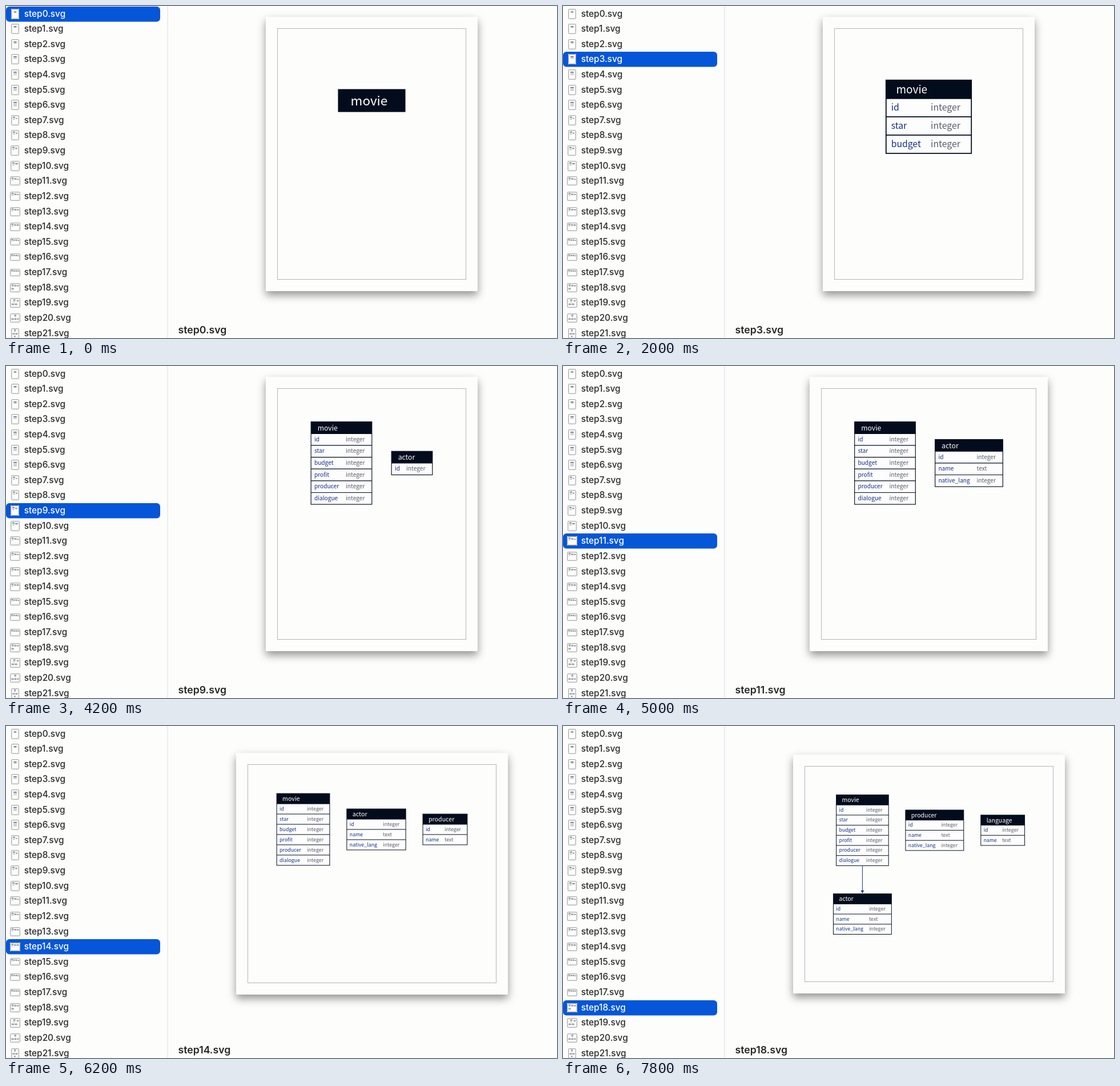
Animation of 965x581 px, one loop 8000 ms. Source, as an HTML page with a canvas:

```html
<!DOCTYPE html>
<html lang="en">
<head>
<meta charset="utf-8">
<title>Schema steps</title>
<style>
html, body { margin: 0; width: 100%; height: 100%; overflow: hidden; background: #fdfdfb; }
canvas { display: block; }
</style>
</head>
<body>
<canvas id="stage" width="965" height="581"></canvas>
<script>
const ctx = document.getElementById('stage').getContext('2d');
const LOOP = 8000, ROW = 36, PAD = 101.5, GAP = 60, FILES = 22, PITCH = 26.62;
const INK = '#030c1c', BLUE = '#152f88', GREY = '#5a5e6a', BACK = '#fdfdfb';
const UI = 'Inter, sans-serif';
const DIAGRAM = '"Noto Sans CJK JP", "Noto Sans CJK SC", "Noto Sans CJK", "Open Sans", sans-serif';

const SCHEMA = [
  ['movie', 'id', 'star', 'budget', 'profit', 'producer', 'dialogue'],
  ['actor', 'id', 'name', 'native_lang'],
  ['producer', 'id', 'name', 'native_lang'],
  ['language', 'id', 'name']
];
const TITLE_W = { movie: 60, actor: 52, producer: 93, language: 93 };
const NAME_W = { id: 15, star: 31, budget: 58, profit: 45, producer: 76, dialogue: 72, name: 46, native_lang: 97 };

// Table positions once relations are present
const LINKED = {
  18: [[10.5, 0], [0, 352], [257, 54], [525, 72]],
  19: [[130, 0], [0, 352], [268, 352], [440, 72]],
  20: [[270, 0], [0, 352], [268, 352], [540, 352]],
  21: [[130, 0], [0, 352], [268, 352], [130, 600]]
};

function layout(step) {
  let left = step + 1, x = 0;
  const tables = [];
  for (const [title, ...all] of SCHEMA) {
    if (left <= 0) break;
    const rows = all.slice(0, left - 1);
    left -= all.length + 1;
    const nameW = Math.max(0, ...rows.map(r => NAME_W[r]));
    const w = Math.max(TITLE_W[title] + 50, rows.length ? nameW + 110 : 0);
    tables.push({ title, rows, nameW, w, h: ROW * (rows.length + 1), x });
    x += w + GAP;
  }
  const tallest = Math.max(...tables.map(t => t.h));
  tables.forEach((t, i) => {
    t.y = (tallest - t.h) / 2;
    if (LINKED[step]) [t.x, t.y] = LINKED[step][i];
  });
  const natW = Math.max(...tables.map(t => t.x + t.w)) + 2 * PAD;
  const natH = Math.max(766, Math.max(...tables.map(t => t.y + t.h)) + 2 * PAD);
  const narrow = natW < 576;
  const s = Math.min(439 / natH * (tables.length > 1 ? 1 : 2), (narrow ? 330 : 435) / natW);
  const w = narrow ? 330 : natW * s;
  return { tables, s, w, h: narrow ? 439 : natH * s, inset: (w - natW * s) / 2, linked: step >= 18 };
}
const layouts = Array.from({ length: FILES }, (_, i) => layout(i));

function text(str, x, y, font, color) {
  ctx.font = font;
  ctx.fillStyle = color;
  ctx.fillText(str, x, y);
}

function drawTable(t) {
  ctx.save();
  ctx.translate(t.x, t.y);
  ctx.fillStyle = '#fdfdfd';
  ctx.fillRect(0, 0, t.w, t.h);
  ctx.fillStyle = INK;
  ctx.fillRect(0, 0, t.w, ROW);
  ctx.strokeStyle = INK;
  ctx.lineWidth = 2;
  ctx.strokeRect(0, 0, t.w, t.h);
  text(t.title, 20, 26, '21.3px ' + DIAGRAM, '#fff');
  t.rows.forEach((name, i) => {
    const y = ROW * (i + 1), type = name === 'name' ? 'text' : 'integer';
    ctx.beginPath();
    ctx.moveTo(0, y);
    ctx.lineTo(t.w, y);
    ctx.stroke();
    text(name, 10, y + 23.3, '500 17.7px ' + DIAGRAM, BLUE);
    text(type, 30 + t.nameW, y + 23.3, '17.8px ' + DIAGRAM, GREY);
  });
  ctx.restore();
}

function drawLink(from, to) {
  const x = from.x + from.w / 2, y = to.y - 2;
  ctx.strokeStyle = ctx.fillStyle = BLUE;
  ctx.lineWidth = 2;
  ctx.beginPath();
  ctx.moveTo(x, from.y + from.h + 1);
  ctx.lineTo(x, y - 8);
  ctx.stroke();
  ctx.beginPath();
  ctx.moveTo(x, y);
  ctx.lineTo(x - 6, y - 10);
  ctx.lineTo(x + 6, y - 10);
  ctx.fill();
}

function drawPreview(l) {
  const x = Math.floor(640.5 - l.w / 2) + 0.5, y = Math.floor(259 - l.h / 2) + 0.5;
  const w = Math.round(l.w), h = Math.round(l.h);
  ctx.save();
  ctx.shadowColor = 'rgba(0,0,0,0.42)';
  ctx.shadowBlur = 14;
  ctx.shadowOffsetY = 6.5;
  ctx.fillStyle = '#fdfdfc';
  ctx.fillRect(x - 20.5, y - 20.5, w + 41, h + 41);
  ctx.restore();
  ctx.strokeStyle = '#b6b6b6';
  ctx.lineWidth = 1;
  ctx.strokeRect(x, y, w, h);
  ctx.save();
  ctx.translate(x + l.inset, y);
  ctx.scale(l.s, l.s);
  ctx.translate(PAD, PAD);
  l.tables.forEach(drawTable);
  if (l.linked) drawLink(l.tables[0], l.tables[1]);
  ctx.restore();
}

function drawIcon(l, cy) {
  const pw = l.w + 41, ph = l.h + 41, k = 18 / Math.max(pw, ph);
  const w = Math.round(pw * k), h = Math.round(ph * k);
  const x = Math.round(15.8 - w / 2), y = Math.round(cy - h / 2);
  ctx.fillStyle = '#fefefe';
  ctx.fillRect(x, y, w, h);
  ctx.lineWidth = 1;
  ctx.strokeStyle = '#dedede';
  ctx.strokeRect(x + 1.5, y + 1.5, w - 3, h - 3);
  ctx.strokeStyle = '#b0b0b0';
  ctx.beginPath();
  ctx.roundRect(x + 0.5, y + 0.5, w - 1, h - 1, 1);
  ctx.stroke();
  const u = k * l.s, at = v => 20.5 * k + (PAD + v) * u;
  for (const t of l.tables) {
    ctx.fillStyle = '#d2d3da';
    ctx.fillRect(x + at(t.x), y + at(t.y), t.w * u, t.h * u);
    ctx.fillStyle = '#50535e';
    ctx.fillRect(x + at(t.x), y + at(t.y), t.w * u, Math.max(1, ROW * u));
  }
}

function drawSidebar(selected) {
  for (let i = 0; i < FILES; i++) {
    const cy = 13.5 + PITCH * i, on = i === selected;
    if (on) {
      ctx.fillStyle = '#0556d8';
      ctx.beginPath();
      ctx.roundRect(0, Math.round(cy - 13), 270, 26.5, 6);
      ctx.fill();
    }
    drawIcon(layouts[i], cy);
    text(`step${i}.svg`, 31.7, cy + 5, '500 15.4px ' + UI, on ? '#fff' : '#2a2a2a');
  }
  ctx.fillStyle = '#dedeec';
  ctx.fillRect(282.5, 0, 1, 581);
}

const stepAt = t => Math.min(18, Math.max(0, Math.floor((t - 600) / 400)));

function draw(now) {
  const t = now % LOOP;
  // The preview trails the selection until it catches up near the end
  const selected = stepAt(t), shown = t < 7200 ? stepAt(t - 200) : selected;
  ctx.fillStyle = BACK;
  ctx.fillRect(0, 0, 965, 581);
  drawSidebar(selected);
  drawPreview(layouts[shown]);
  text(`step${selected}.svg`, 301.5, 573, '600 17.7px ' + UI, '#262626');
}

let start;
function tick(now) {
  start ??= now;
  draw(now - start);
  requestAnimationFrame(tick);
}
draw(0);
requestAnimationFrame(tick);
</script>
</body>
</html>
```
